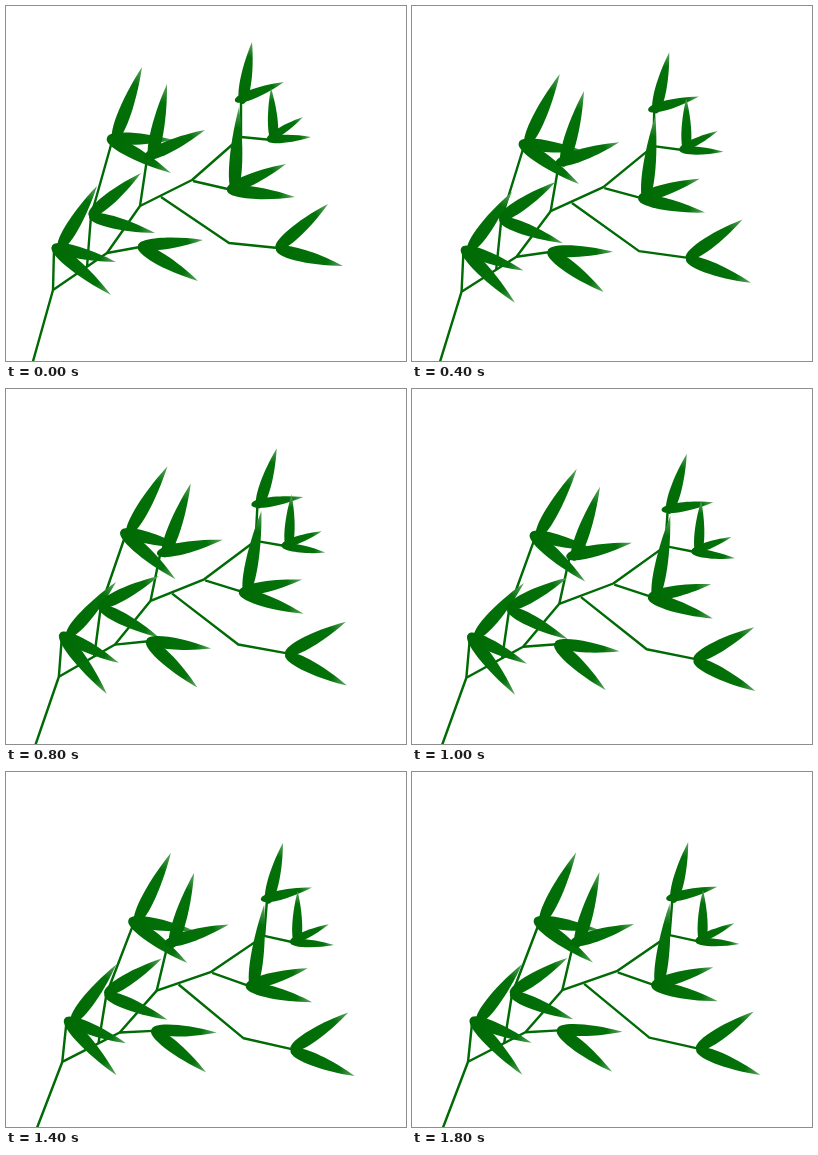
Write an HTML page that moves like this. It is 400 px wide and 355 px high and loops after 2000 ms.

```html
<!DOCTYPE html>
<html lang="en">
<head>
<meta charset="utf-8">
<title>Swaying bamboo</title>
<style>
  html, body { margin: 0; width: 100%; height: 100%; overflow: hidden; background: #fff; }
  svg { display: block; width: 400px; height: 355px; }
</style>
</head>
<body>
<svg viewBox="0 0 400 355">
  <defs>
    <linearGradient id="blade">
      <stop offset="0" stop-color="#006a04"/>
      <stop offset=".76" stop-color="#04720a"/>
      <stop offset="1" stop-color="#62a868"/>
    </linearGradient>
  </defs>
  <g id="stems" fill="none" stroke="#006a04" stroke-width="2.4" stroke-linejoin="round">
    <path d="M24 366L47 284 101 247 134 200 186 174 235 131 266 134"/>
    <path d="M235 131V95M187 175L226 184M155 191L223 237 272 242M134 200L141 153"/>
    <path d="M101 247L134 241M81 261L85 210 105 139M47 284L48 243"/>
  </g>
  <g id="leaves" fill="url(#blade)"></g>
</svg>
<script>
const LOOP = 2000, STEP = 200;
const stems = document.getElementById('stems');
const group = document.getElementById('leaves');
const leaves = [];

// Adds one leaf; steep ones grow from slightly inside the cluster
function addLeaf(hubX, hubY, tipX, tipY) {
  const steep = hubY - tipY > tipX - hubX;
  const x = hubX + (steep ? 7 : 0), y = hubY + (steep ? 3 : 0);
  const len = Math.hypot(tipX - x, tipY - y), angle = Math.atan2(tipY - y, tipX - x);
  const h = Math.min(8.6, len * .122);
  const el = document.createElementNS('http://www.w3.org/2000/svg', 'path');
  el.setAttribute('d', `M0 0C0 ${-h} ${len / 2} ${-h} ${len} 0C${len / 2} ${h} 0 ${h} 0 0Z`);
  group.append(el);
  leaves.push({ el, x, y, angle: angle * 180 / Math.PI, gain: Math.min(.95, .5 + .6 * Math.cos(angle)) });
}

// Cluster: hub, then the tips of its leaves
function cluster(x, y, ...tips) {
  for (const [tx, ty] of tips) addLeaf(x, y, tx, ty);
}

cluster(46, 240, [91, 180], [110, 256], [105, 289]);
cluster(83, 210, [135, 167], [149, 227]);
cluster(101, 132, [136, 61], [167, 134], [165, 167]);
cluster(138, 152, [161, 78], [199, 124]);
cluster(132, 240, [197, 234], [192, 275]);
cluster(229, 95, [246, 36], [278, 76]);
cluster(261, 134, [265, 82], [297, 111], [305, 131]);
cluster(221, 184, [233, 101], [280, 158], [289, 191]);
cluster(270, 243, [322, 198], [337, 260]);

function pose(i) {
  const s = Math.sin(Math.PI * i / 15.6);
  const bend = (s + s * s) / 2;
  const turn = 7 * bend + 9 * Math.sin(Math.PI * i / 8) ** 2;

  // The stems lean over as one sheared sheet, the leaves also turn about their base
  const lean = new DOMMatrix([1 + .01 * bend, .13 * bend, -.08 * bend, 1 - .02 * bend, 31.7 * bend, 5.6 * bend]);
  stems.setAttribute('transform', lean.toString());
  for (const { el, x, y, angle, gain } of leaves) {
    const p = lean.transformPoint({ x, y });
    el.setAttribute('transform', `translate(${p.x} ${p.y}) rotate(${angle + turn * gain})`);
  }
}

let shown = -1;
function tick() {
  const i = Math.floor(performance.now() % LOOP / STEP);
  if (i !== shown) pose(shown = i);
  requestAnimationFrame(tick);
}
tick();
</script>
</body>
</html>
```
